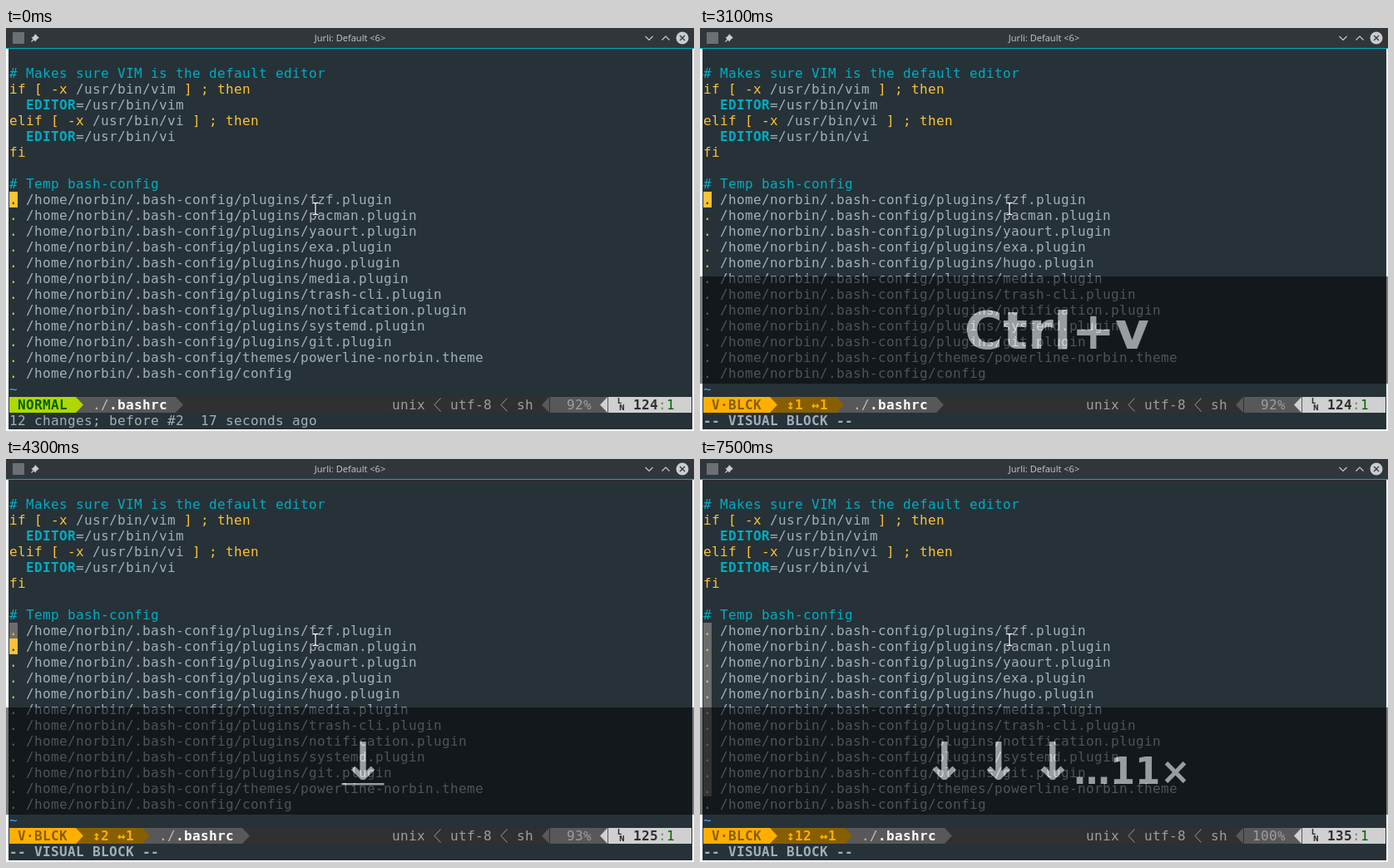
Write an HTML page with a canvas that moves like this. It is 827 px wide and 485 px high and loops after 8 s.

```html
<!DOCTYPE html>
<html lang="en">
<head>
<meta charset="utf-8">
<title>Terminal: block selection</title>
<style>
html, body { margin: 0; width: 100%; height: 100%; overflow: hidden; background: #fff; }
canvas { display: block; }
</style>
</head>
<body>
<canvas id="stage" width="827" height="485"></canvas>
<script>
const ctx = document.getElementById('stage').getContext('2d');
const LOOP = 8000, CW = 10, RH = 19, X0 = 4, Y0 = 26;
const BG = '#263238', FG = '#a1b0b8', YEL = '#ffc135', CYAN = '#00acc1', BLUE = '#42a5f5';
const FIRST = 9, LAST_LINE = 135;
const MONO = '"DejaVu Sans Mono", monospace', SANS = '"DejaVu Sans", sans-serif';

const HOME = '/home/norbin/.bash-config/';
const plugins = ['fzf', 'pacman', 'yaourt', 'exa', 'hugo', 'media', 'trash-cli', 'notification', 'systemd', 'git'];
const sourced = [...plugins.map(p => `plugins/${p}.plugin`), 'themes/powerline-norbin.theme', 'config'];

// Times of the Down key, and how long each key stays underlined
const downs = [4200, 4600, 4800, 5200, 5500, 5700, 5900, 6100, 6200, 6400, 6800];
const marks = [200, 200, 200, 100, 100, 200, 100, 100, 200, 200, 200];
const cursorOff = [[600, 1200], [2400, 3100], [3700, 4200], [7500, 8000]];
const fade = [[0, 0], [1900, .36], [2000, .52], [3500, .12], [3600, .05], [3700, .02], [3800, 0], [4200, .36], [4300, .52]];

function box(x, y, w, h, color) {
  ctx.fillStyle = color;
  ctx.fillRect(x, y, w, h);
}

function poly(points, color) {
  ctx.fillStyle = color;
  ctx.beginPath();
  points.forEach(([x, y]) => ctx.lineTo(x, y));
  ctx.fill();
}

function line(points, color, width) {
  ctx.strokeStyle = color;
  ctx.lineWidth = width;
  ctx.beginPath();
  points.forEach(([x, y]) => ctx.lineTo(x, y));
  ctx.stroke();
}

const colX = col => X0 + col * CW;
const rowY = row => Y0 + row * RH;

// Writes on the character grid and returns the next column
function put(row, col, str, color = FG, bold = false) {
  ctx.font = `${bold ? 'bold ' : ''}16px ${MONO}`;
  ctx.fillStyle = color;
  ctx.textAlign = 'left';
  for (const ch of str) {
    if (ch !== ' ') ctx.fillText(ch, colX(col), rowY(row) + 15);
    col++;
  }
  return col;
}

function spans(row, ...parts) {
  let col = 0;
  for (const [str, color, bold] of parts) col = put(row, col, str, color, bold);
}

function titleBar() {
  box(0, 0, 827, 24, '#31363b');
  box(0, 24, 827, 1, '#00acc1');
  box(8, 5, 14, 14, '#6b7074');
  ctx.font = '11px "Noto Sans", sans-serif';
  ctx.textAlign = 'center';
  ctx.fillStyle = '#bdc3c7';
  ctx.fillText('Jurli: Default <6>', 413.5, 16);

  const ink = '#c9cdd0';
  poly([[35, 7], [40, 12], [38.5, 12.5], [36, 15], [35.5, 16.5], [30.5, 11.5], [32, 11], [34.5, 8.5]], ink);
  line([[33.5, 13.5], [30.5, 16.5]], ink, 1.2);
  line([[768.5, 10], [773, 14.5], [777.5, 10]], ink, 1.2);
  line([[788.5, 14.5], [793, 10], [797.5, 14.5]], ink, 1.2);
  ctx.fillStyle = ink;
  ctx.beginPath();
  ctx.arc(813, 12, 7.5, 0, 7);
  ctx.fill();
  line([[810, 9], [816, 15]], '#31363b', 1.3);
  line([[816, 9], [810, 15]], '#31363b', 1.3);
}

function script() {
  spans(1, ['# Makes sure VIM is the default editor', CYAN]);
  spans(2, ['if [ -x ', YEL], ['/usr/bin/vim'], [' ] ; then', YEL]);
  spans(3, ['  EDITOR', CYAN, true], ['=/usr/bin/vim']);
  spans(4, ['elif [ -x ', YEL], ['/usr/bin/vi'], [' ] ; then', YEL]);
  spans(5, ['  EDITOR', CYAN, true], ['=/usr/bin/vi']);
  spans(6, ['fi', YEL]);
  spans(8, ['# Temp bash-config', CYAN]);
  put(21, 0, '~', BLUE);
}

function sourceLines(cur, cursorOn) {
  sourced.forEach((path, i) => {
    const row = FIRST + i, y = rowY(row), onCursor = i === cur && cursorOn;
    if (i < cur) box(X0, y, CW, RH, '#6c6c6c');
    if (onCursor) box(X0, y, CW, RH, YEL);
    put(row, 0, '.', onCursor ? BG : YEL);
    put(row, 2, HOME + path);
  });
}

function statusLine(visual, cur) {
  const row = 22, y = rowY(row), mid = y + RH / 2;
  const GREY = '#585858', DARK = '#303030', LIGHT = '#d0d0d0', SOFT = '#9e9e9e';
  const fill = (a, b, color) => box(colX(a), y, (b - a) * CW, RH, color);
  const right = (col, color) => poly([[colX(col), y], [colX(col) + 9, mid], [colX(col), y + RH]], color);
  const left = (col, color) => poly([[colX(col) + 9, y], [colX(col), mid], [colX(col) + 9, y + RH]], color);
  const thin = col => line([[colX(col) + 8.5, y + 1.5], [colX(col) + 1, mid], [colX(col) + 8.5, y + RH - 1.5]], SOFT, 1);

  fill(0, 82, DARK);
  const [mode, modeBg, modeInk] = visual ? ['V·BLCK', '#ffaf00', '#875f00'] : ['NORMAL', '#afd700', '#005f00'];
  const size = visual ? `↕${cur + 1} ↔1` : '';
  const end = visual ? size.length + 11 : 8;
  fill(0, 8, modeBg);
  put(row, 1, mode, modeInk, true);
  fill(end, end + 12, GREY);
  if (visual) {
    fill(8, end, '#875f00');
    right(end, '#875f00');
    put(row, 10, size, '#ffaf00', true);
  }
  right(8, modeBg);
  put(row, end + 2, './', '#bcbcbc');
  put(row, end + 4, '.bashrc', '#fff', true);
  right(end + 12, GREY);

  put(row, 46, 'unix', SOFT);
  thin(51);
  put(row, 53, 'utf-8', SOFT);
  thin(59);
  put(row, 61, 'sh', SOFT);
  left(64, GREY);
  fill(65, 71, GREY);
  const num = 124 + cur;
  put(row, 66, `${Math.round(num / LAST_LINE * 100)}%`.padStart(4), SOFT);
  fill(71, 72, GREY);
  left(71, LIGHT);
  fill(72, 82, LIGHT);
  ctx.font = `bold 8px ${SANS}`;
  ctx.fillStyle = DARK;
  ctx.fillText('L', 735, y + 8);
  ctx.fillText('N', 737, y + 16);
  put(row, 75, String(num), DARK, true);
  put(row, 78, ':', '#6c8a6c');
  put(row, 79, '1', '#005f00');
}

function pointer() {
  const beam = [[[368.5, 210.5], [371, 210.5], [372, 211.5], [373, 210.5], [375.5, 210.5]],
    [[372, 211], [372, 224]],
    [[368.5, 224.5], [371, 224.5], [372, 223.5], [373, 224.5], [375.5, 224.5]]];
  beam.forEach(p => line(p, '#10181c', 3));
  beam.forEach(p => line(p, '#fff', 1.3));
}

// Key display: a translucent black band with white text
function keyBand(t, alpha, count) {
  const MID = 429, BASE = 386, BIG = 62.7, SMALL = BIG / 1.44, ARROW = 51, GAP = 14;
  ctx.globalAlpha = alpha;
  box(0, 299, 827, 129, '#000');
  ctx.globalCompositeOperation = 'lighter';
  ctx.fillStyle = '#fff';
  const big = `bold ${BIG}px ${SANS}`;
  ctx.font = big;
  if (!count) {
    ctx.textAlign = 'center';
    ctx.fillText('Ctrl+v', MID, BASE);
    if (t < 2100) box(318, 395, 222, 6, '#fff');
  } else {
    const arrows = Math.min(count, 3), arrowsW = arrows * (ARROW + GAP) - GAP;
    const tail = count > 3 ? `…${count}×` : '';
    ctx.font = `bold ${SMALL}px ${SANS}`;
    const tailW = ctx.measureText(tail).width;
    const x = MID - (arrowsW + tailW) / 2;
    const marked = t < downs[count - 1] + marks[count - 1];
    ctx.textAlign = 'left';
    ctx.fillText(tail, x + arrowsW, BASE + 5);
    ctx.font = big;
    ctx.textAlign = 'center';
    for (let i = 0; i < arrows; i++) ctx.fillText('↓', x + ARROW / 2 + i * (ARROW + GAP), BASE);
    if (marked && tail) box(x + arrowsW, 398, tailW, 4, '#fff');
    else if (marked) box(x + arrowsW - ARROW, 390, ARROW, 2.5, '#fff');
  }
  ctx.globalCompositeOperation = 'source-over';
  ctx.globalAlpha = 1;
}

function draw(now) {
  const t = now % LOOP;
  const visual = t >= 1900;
  const count = downs.filter(d => t >= d).length;
  const cursorOn = !cursorOff.some(([a, b]) => t >= a && t < b);
  const alpha = fade.filter(([at]) => t >= at).pop()[1];

  box(0, 0, 827, 485, '#fff');
  box(3, 25, 822, 458, BG);
  titleBar();
  script();
  sourceLines(count, cursorOn);
  statusLine(visual, count);
  if (visual) put(23, 0, '-- VISUAL BLOCK --', FG, true);
  else put(23, 0, '12 changes; before #2  17 seconds ago');
  if (alpha) keyBand(t, alpha, count);
  pointer();
  requestAnimationFrame(draw);
}
requestAnimationFrame(draw);
</script>
</body>
</html>
```
